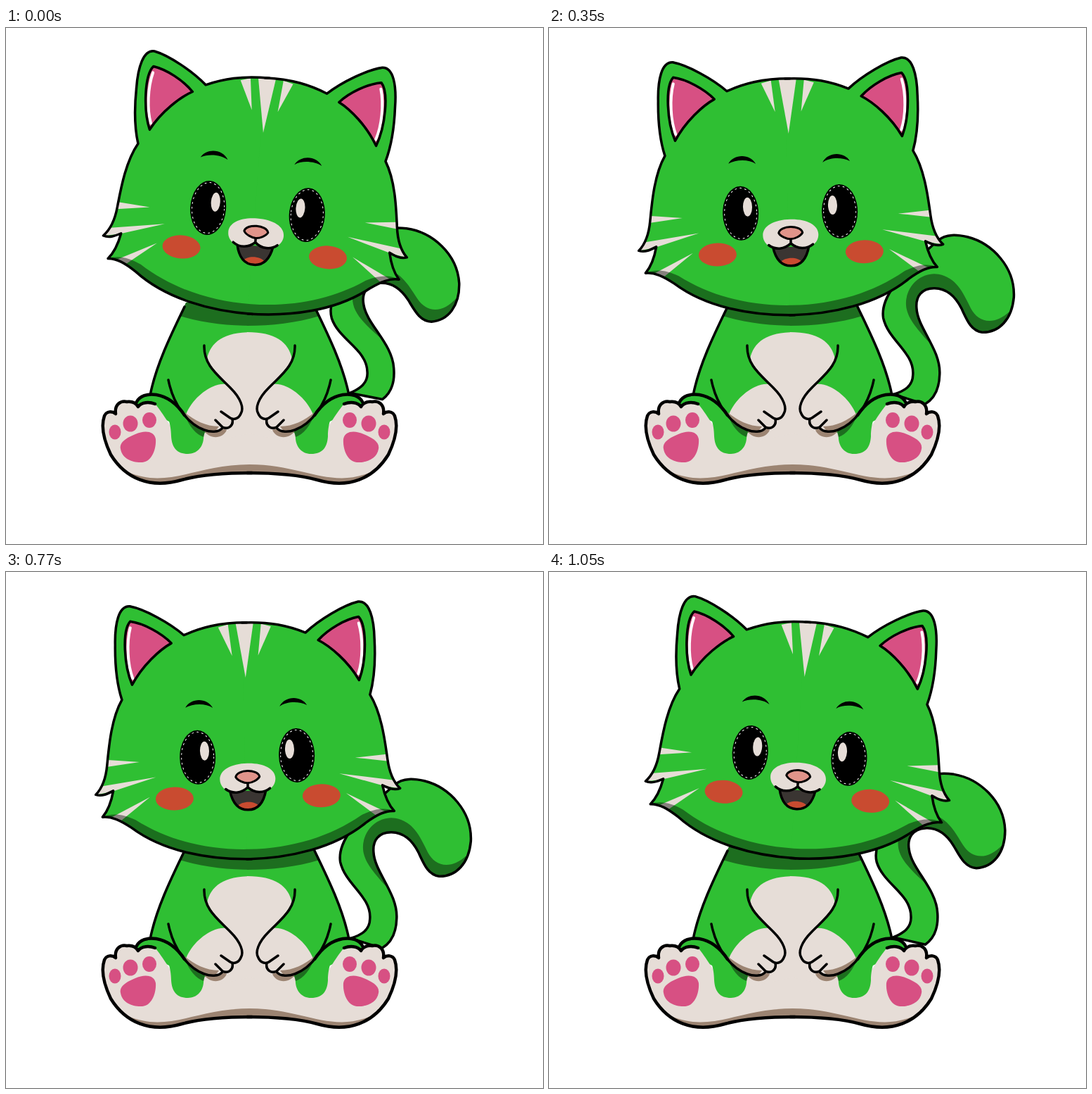
Recreate the animation shown at these times as an HTML page. Size 764 by 733 pixels, loop 1120 ms.

```html
<!DOCTYPE html>
<html lang="en">
<head>
<meta charset="utf-8">
<title>Green kitten</title>
<style>
  html, body { margin: 0; width: 100%; height: 100%; overflow: hidden; background: #fff; }
  svg { display: block; width: 764px; height: 733px; }
  path, ellipse { stroke-linecap: round; stroke-linejoin: round; }
  .green { fill: #2fbf33; }
  .dark { fill: #1d6e1f; }
  .cream { fill: #e6ddd7; }
  .brown { fill: #9c8472; }
  .pink { fill: #d75083; }
  .blush { fill: #c94b30; }
  .shade { fill: #000; fill-opacity: .42; }
  .line { fill: none; stroke: #000; stroke-width: 3.5; }
  .thick { stroke-width: 4.5; }
  .glint { fill: none; stroke: #fff; stroke-width: 1; stroke-dasharray: 2 5; }
  .sliver { fill: none; stroke: #fff; stroke-width: 4; }
</style>
</head>
<body>
<svg id="stage" viewBox="0 0 764 733"></svg>
<script>
const STEP = 70;
const PERIOD = 16;
// Head lean in degrees and tail sway as a share of its full swing, per step.
const lean = [4.1, 3.4, 2.6, 1.3, 0, -1.2, -2.4, -3.5, -4, -3.2, -2.2, -1.2, 0, 1.3, 2.5, 3.6];
const sway = [-1, -.7, -.45, -.2, 0, .27, .54, .8, 1, .75, .5, .27, .03, -.2, -.45, -.7];

const path = (cls, d) => `<path class="${cls}" d="${d}"/>`;
const oval = (cls, x, y, rx, ry) =>
  `<ellipse class="${cls}" cx="${x}" cy="${y}" rx="${rx}" ry="${ry}"/>`;
// Left half plus its reflection about x = 346.5.
const both = s => `${s}<g transform="matrix(-1 0 0 1 693 0)">${s}</g>`;

const tailShape = 'M548 300C560 290 575 291 590 294C625 302 659 335 658 378C656 410 638 429 614 429' +
  'C598 427 592 412 584 396C574 377 560 368 545 368C527 368 518 380 520 397' +
  'C522 425 556 455 555 490C555 512 548 525 535 533L490 520C505 515 517 508 517 492' +
  'C519 460 481 444 473 412C468 385 490 355 548 300Z';
const tailShade = 'M540 446C515 420 503 405 505 385C508 360 530 345 550 348C575 352 585 372 597 395' +
  'C608 415 630 420 653 398C645 425 630 430 614 429C598 427 592 412 584 396' +
  'C574 377 560 368 545 368C527 368 518 380 520 397C521 415 532 432 540 446Z';
const tail = path('green', tailShape) + path('dark', tailShade) + path('line', tailShape);

const side = 'M254 396C235 435 213 480 205 522';
const foot = 'M350 632C310 632 275 635 250 642C205 655 170 640 149 606C139 585 135 565 140 551' +
  'C143 544 151 544 156 548C154 534 164 529 172 531C180 530 185 533 188 538C193 531 204 531 212 534';
const thigh = 'M186 531C194 515 230 514 254 550';
const leg = thigh + 'L300 574L281 575C283 595 272 605 259 605' +
  'C242 605 236 595 235 580C235 562 229 540 212 534C204 531 193 531 188 538Z';
const armLine = 'M282 451C281 480 303 494 320 512C334 526 339 540 334 548C331 555 324 557 319 554L306 545';
const pawLine = 'M322 556C324 565 316 571 308 567L298 557M308 568C303 575 290 574 282 571C258 562 238 535 231 500';
const paw = 'M256 549C268 520 297 504 312 506C330 522 340 538 334 548C331 555 326 557 322 556' +
  'C324 565 316 571 308 568C303 575 290 574 282 571C272 567 263 559 256 549Z';

const torso = both(
  path('green', side + 'L205 545L350 620V396Z') +
  path('dark', 'M350 390H256L247 409C280 419 315 423 350 423Z') +
  path('cream', 'M350 432C310 432 291 446 286 470C294 486 310 501 320 512L336 540L300 573L275 575V620H350Z') +
  path('line', side)
);
const lower = both(path('cream', foot + 'C235 560 245 600 281 590L350 575Z')) +
  path('brown', 'M172 630C230 656 270 620 346.5 620C423 620 463 656 521 630C490 650 467 648 443 642' +
    'C418 635 383 632 346.5 632C310 632 275 635 250 642C226 648 203 650 172 630Z') +
  both(
    path('green', leg) +
    path('dark', 'M253 546C260 566 270 577 281 581L284 570Z') +
    path('brown', 'M281 571C288 584 308 585 314 571L300 566Z') +
    path('line thick', foot) +
    path('line thick', thigh) +
    path('cream', paw) +
    path('brown', 'M254 546C268 557 284 566 303 566L297 574C275 571 262 560 254 546Z') +
    path('line', armLine + pawLine) +
    oval('pink', 155, 574, 8.5, 10.5) +
    oval('pink', 177, 562, 10.5, 11.5) +
    oval('pink', 204, 557, 10, 11) +
    path('pink', 'M163 598C161 588 172 582 184 577C197 571 211 572 213 584C214 597 208 616 194 617C181 618 165 612 163 598Z')
  );

const skull = 'M350 72C310 71 284 78 260 88C240 70 205 50 184 45.5C168 44 162 70 162 100' +
  'C161 130 164 158 170 178C154 205 150 245 147 270C145 288 140 302 130 312' +
  'C139 315 147 311 155 307C152 322 146 336 139 344C152 343 164 349 180 360C225 395 290 408 350 408';
const ear = 'M184 67C203 70 228 84 242 99C225 108 200 130 185 157C174 130 172 80 184 67Z';

const stripes = path('cream', 'M334 73H359L346.5 150Z') + both(
  path('cream', 'M309 78L323 74L328 119Z') +
  path('cream', 'M148 263L193 267L146 273Z') +
  path('cream', 'M140 300L216 289L153 308L132 312Z') +
  path('cream', 'M151 345L207 317L166 349Z')
);
const headFill = both(path('green', skull + 'Z')) + stripes;
const headShade = path('shade', 'M139 344C152 338 168 340 186 349C230 378 285 394 346.5 394' +
  'C408 394 463 378 507 349C525 340 541 338 554 344C541 343 529 349 513 360' +
  'C468 395 403 408 346.5 408C290 408 225 395 180 360C164 349 152 343 139 344Z');
const face = both(
  path('line', skull) +
  path('pink', ear) +
  path('sliver', 'M184 76C178 98 179 128 186 148') +
  path('line', ear) +
  path('', 'M260 191C268 177 291 177 299 192C289 185 271 185 260 191Z') +
  oval('', 276, 262, 25.5, 38.5) +
  oval('glint', 276, 262, 23, 36) +
  oval('cream', 286, 253, 6.5, 13.5) +
  oval('blush', 242, 320, 27, 16.5)
);
const jaw = 'M321 311C325 331 334 338 346.5 338C359 338 368 331 372 311';
const muzzle =
  `<path d="${jaw}Z" fill="#3a3532"/>` +
  path('blush', 'M331 333C337 325 356 325 362 333C353 340 340 340 331 333Z') +
  path('line', jaw) +
  path('cream', 'M346.5 272C370 272 386 281 386 294C386 308 371 315 361 313C353 312 349 309 346.5 306' +
    'C344 309 340 312 332 313C322 315 307 308 307 294C307 281 323 272 346.5 272Z') +
  path('line', 'M346.5 299V306C337 315 324 315 315 308M346.5 306C356 315 369 315 378 308') +
  `<path d="M329.5 291C332 280 361 280 363.5 291C361 296 352 300 346.5 300C341 300 332 296 329.5 291Z"
    fill="#e0948a" stroke="#000" stroke-width="3"/>`;

document.getElementById('stage').innerHTML =
  `<g id="tail">${tail}</g>${torso}${lower}<g id="head">${headFill}${headShade}${face}${muzzle}</g>`;

const headNode = document.getElementById('head');
const tailNode = document.getElementById('tail');

function draw(now) {
  const i = Math.floor(now / STEP) % PERIOD;
  const a = lean[i];
  headNode.setAttribute('transform', `translate(0 ${-.11 * a * a}) rotate(${a} 346.5 422)`);
  tailNode.setAttribute('transform', `rotate(${4.9 * sway[i]} 472 525)`);
}

let start;
function tick(now) {
  start ??= now;
  draw(now - start);
  requestAnimationFrame(tick);
}
draw(0);
requestAnimationFrame(tick);
</script>
</body>
</html>
```
